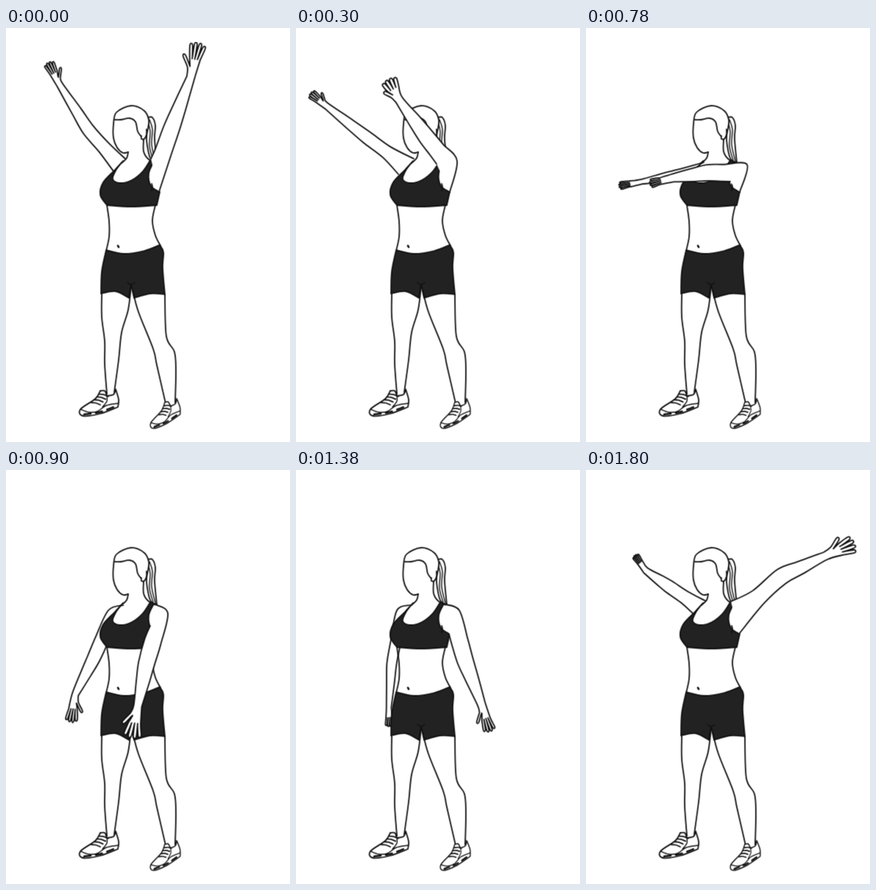
Animation, 387 px wide and 562 px high, one loop 2100 ms. Source, as an HTML page:

```html
<!DOCTYPE html>
<html lang="en">
<head>
<meta charset="utf-8">
<title>Arm circles</title>
<style>
  html, body { margin: 0; width: 100%; height: 100%; overflow: hidden; background: #fff; }
  svg { display: block; width: 100vw; height: 100vh; overflow: hidden; }
  path { fill: none; stroke: #111; stroke-width: 1.8; stroke-linecap: round; stroke-linejoin: round; }
  .skin { fill: #fff; }
  .cloth { fill: #222; }
  .tread { stroke-width: 2.6; stroke-dasharray: 9 7; }
  .fine { stroke-width: 1.4; }
  /* poses sit side by side, the strip jumps one stage width at a time */
  .strip { animation: swing 2.1s steps(7) infinite; }
  @keyframes swing { to { transform: translateX(-2709px); } }
</style>
</head>
<body>
<!-- data-pts: smooth runs of points; "/" makes a corner, ";" lifts the pen -->
<svg viewBox="-.5 -.5 387 562">
  <g id="far" class="strip"></g>

  <!-- ponytail, head, neck -->
  <path class="skin" data-pts="193,121 199,121 203,132 202,150 205,182 / 196,176 191,151 193,136"/>
  <path class="fine" data-pts="195,124 199,137 198,158 203,180;193,128 196,140 195,160 200,179"/>
  <path class="skin" data-pts="166,168 159,169 151,162 146,149 146,130 150,114 170,105 188,112 194,124 193,136"/>
  <path data-pts="148,124 156,124 168,122 176,127 179,140 184,147"/>
  <path class="skin" data-pts="184,146 184,150 188,150 191,144 191,137"/>
  <path data-pts="166,168 164,176 157,183;187,151 187,167 193,177 204,183"/>

  <!-- top, waist, shorts -->
  <path class="cloth" data-pts="159,180 148,192 132,209 128,226 137,240 / 170,242 205,240 / 209,222 / 197,214 194,197 201,181 / 196,179 / 186,194 171,206 155,210 145,205 149,193 159,180"/>
  <path data-pts="137,240 140,262 140,283 136,302;203,240 199,261 203,281 210,295;198,211 199,215 198,220"/>
  <path class="tread" data-pts="152,295 153,297"/>
  <path class="cloth" data-pts="136,301 160,306 188,302 209,294 / 214,304 213,325 216,361 / 196,360 174,366 / 170,348 / 167,366 / 149,357 129,360 / 130,330 136,301"/>
  <path class="fine" data-pts="165,345 170,348 175,345"/>

  <!-- legs -->
  <path data-pts="130,360 130,392 134,425 134,456 137,496;170,350 166,382 157,413 153,450 147,494"/>
  <path data-pts="172,355 180,385 200,435 205,457 217,509;216,361 218,418 229,439 231,465 230,508"/>
  <g id="shoe"></g>
  <use href="#shoe" transform="matrix(.79 -.17 .1 .91 65.4 82)"/>

  <g id="near" class="strip"></g>
</svg>
<script>
  const make = (tag, parent) =>
    parent.appendChild(document.createElementNS('http://www.w3.org/2000/svg', tag));
  const points = s => s.trim().split(/\s+/).map(p => p.split(',').map(Number));
  const mid = (a, b, t = .5) => a.map((v, i) => v + (b[i] - v) * t);
  const heading = (a, b) => Math.atan2(b[1] - a[1], b[0] - a[0]);
  const go = (p, angle, r) => [p[0] + Math.cos(angle) * r, p[1] + Math.sin(angle) * r];
  const left = (p, angle, r) => go(p, angle - Math.PI / 2, r);

  // Cubic from b to c, with a and e as the outer neighbours
  function bend(a, b, c, e) {
    const h1 = b.map((v, i) => v + (c[i] - a[i]) / 6);
    const h2 = c.map((v, i) => v - (e[i] - b[i]) / 6);
    return `C${h1} ${h2} ${c}`;
  }

  // Smooth runs of points joined at corners
  function curve(runs) {
    let pen, d = `M${runs[0][0]}`;
    for (const run of runs) {
      const p = pen ? [pen, ...run] : run;
      for (let i = 0; i < p.length - 1; i++) {
        d += bend(p[i - 1] || p[i], p[i], p[i + 1], p[i + 2] || p[i + 1]);
      }
      pen = p[p.length - 1];
    }
    return d;
  }
  const trace = text => text.split(';').map(part => curve(part.split('/').map(points))).join('');

  function digit(base, angle, length, half) {
    const end = go(base, angle, length * .85);
    return [left(base, angle, half), left(end, angle, half), go(base, angle, length),
            left(end, angle, -half), left(base, angle, -half)];
  }

  // Four fanned fingers; thumb is -1 left, 1 right, 0 hidden
  function hand(wrist, tip, palm, thumb) {
    const angle = heading(wrist, tip);
    const length = Math.hypot(tip[0] - wrist[0], tip[1] - wrist[1]);
    const knuckles = go(wrist, angle, length * .55);
    const runs = [-1.5, -.5, .5, 1.5].map(k => digit(
      left(knuckles, angle, -k * palm / 4), angle + k * palm * .009,
      length * (.46 - .05 * Math.abs(k)), palm / 8));
    if (thumb) {
      const base = left(go(wrist, angle, length * .28), angle, -thumb * palm * .38);
      const run = digit(base, angle + thumb * .6, length * .38, palm / 8);
      thumb < 0 ? runs.unshift(run) : runs.push(run);
    }
    return runs;
  }

  // bones: left root / elbow, wrist, fingertip / right root
  function arm(bones, size, palm, thumb) {
    const [start, [elbow, wrist, tip], end] = bones.split('/').map(points);
    const root = mid(start[start.length - 1], end[0]);
    const upper = heading(root, elbow), fore = heading(elbow, wrist);
    const turn = Math.atan2(Math.sin(fore - upper), Math.cos(fore - upper));
    const side = s => [
      left(mid(root, elbow), upper, s * 11.5),
      left(elbow, upper + turn / 2, s * 11),
      left(mid(elbow, wrist, .42), fore, s * 9),
      left(wrist, fore, s * 5.5)
    ];
    return curve([[...start, ...side(size)], ...hand(wrist, tip, palm, thumb),
                  [...side(-size).reverse(), ...end]]);
  }

  function addArms(id, poses) {
    const strip = document.getElementById(id);
    poses.forEach((pose, i) => {
      const path = make('path', strip);
      path.setAttribute('class', 'skin');
      path.setAttribute('d', arm(...pose));
      path.setAttribute('transform', `translate(${i * 387})`);
    });
  }

  function addStroke(parent, pts, kind) {
    const path = make('path', parent);
    path.setAttribute('class', kind);
    path.setAttribute('d', trace(pts));
  }

  for (const path of document.querySelectorAll('[data-pts]')) {
    path.setAttribute('d', trace(path.dataset.pts));
  }

  const shoe = document.getElementById('shoe');
  addStroke(shoe, '128,492 121,503 101,517 104,526 128,523 152,514 / 153,504 149,490 / 146,497 137,499 / 134,492 128,492', 'skin');
  addStroke(shoe, '101,517 112,521 124,520 136,512 152,509;137,499 137,506 131,514', 'fine');
  addStroke(shoe, '106,524 127,521 151,512', 'tread');
  for (let i = 0; i < 4; i++) {
    const x = 116 + 3.6 * i, y = 508 - 3.8 * i;
    addStroke(shoe, `${x},${y} ${x + 6},${y + .5} ${x + 12},${y + 3}`, '');
  }

  addArms('far', [
    ['146,194 / 112,138 73,77 57,46 / 162,177', .77, 11, 1],
    ['139,198 / 96,148 42,106 19,88 / 160,177', .77, 10, 1],
    ['140,203 / 118,200 76,208 44,214 / 160,182', .6, 8, 0],
    ['145,215 / 119,255 94,304 88,342 / 139,190 159,183', .8, 12, -1],
    ['145,215 / 130,262 126,322 127,348 / 137,190 155,183', .6, 9, 0],
    ['145,215 / 125,243 118,271 116,297 / 137,189 159,180', .77, 12, 1],
    ['145,194 / 113,158 81,136 66,115 / 162,177', .77, 8, 0]
  ]);
  addArms('near', [
    ['197,177 / 225,136 251,67 262,19 / 208,222', 1, 15, -1],
    ['191,184 / 177,147 140,97 125,69 / 219,180 209,222', 1, 17, -1],
    ['196,208 / 165,196 118,203 86,211 / 219,185 209,222', 1, 9, 0],
    ['203,182 220,194 / 191,262 179,320 171,364 / 196,211', 1, 17, 1],
    ['203,182 222,190 / 230,258 252,317 264,355 / 208,222', 1, 12, 1],
    ['203,182 / 258,236 306,268 343,291 / 215,214 208,222', .8, 13, -1],
    ['197,178 / 266,144 326,116 366,99 / 208,222', 1, 17, -1]
  ]);
</script>
</body>
</html>
```
